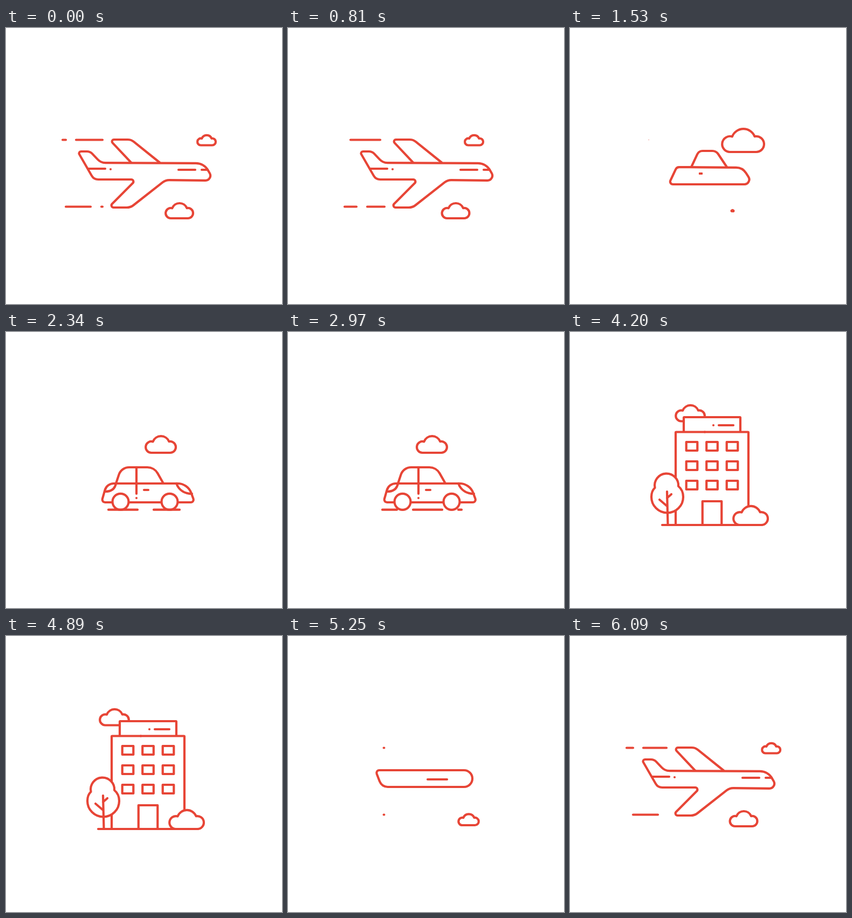
An HTML page with a canvas for the animation above (6.12 s loop, 512 by 512 pixels).

```html
<!DOCTYPE html>
<html lang="en">
<head>
<meta charset="utf-8">
<title>Travel line icons</title>
<style>
html, body { margin: 0; width: 100%; height: 100%; overflow: hidden; background: #fff; }
canvas { display: block; width: 512px; height: 512px; }
</style>
</head>
<body>
<canvas id="stage" width="512" height="512"></canvas>
<script>
const ctx = document.getElementById('stage').getContext('2d');
const LOOP = 6120, STEP = 30, INK = '#e74536', LINE = 4.2;

// Easing
const linear = p => p;
const easeIn = p => p * p;
const smooth = p => p * p * (3 - 2 * p);
const outBack = p => 1 + 1.9 * (p - 1) ** 3 + 0.9 * (p - 1) ** 2;

const mix = (a, b, p) => Array.isArray(a) ? a.map((v, i) => mix(v, b[i], p)) : a + (b - a) * p;

// keys: [time, value, easing towards this key]
function at(t, keys) {
  if (t <= keys[0][0]) return keys[0][1];
  for (let i = 1; i < keys.length; i++) {
    const [t0, a] = keys[i - 1], [t1, b, ease = linear] = keys[i];
    if (t < t1) return mix(a, b, ease((t - t0) / (t1 - t0)));
  }
  return keys[keys.length - 1][1];
}

// plane -> squeeze -> car -> squeeze -> house -> squeeze -> plane
const morph = (plane, a, car, b, house, c, out = outBack) => [
  [1320, plane], [1530, a, easeIn], [1860, car, out],
  [3200, car], [3480, b, easeIn], [3900, house, out],
  [5010, house], [5250, c, easeIn], [5680, plane, out]
];

// 0 -> 1, hold, 1 -> 0
const show = (from, full, leave, gone, ease = outBack) =>
  [[from, 0], [full, 1, ease], [leave, 1], [gone, 0, easeIn]];

// Four corners (x, y, radius) padded to the ten corners of the plane
function quad(tl, tr, br, bl) {
  const top = [0.2, 0.35].map(p => mix(tl, tr, p));
  const base = [0.3, 0.45, 0.6, 0.75].map(p => mix(br, bl, p));
  return [tl, ...top, tr, br, ...base, bl];
}
const block = (x1, y1, x2, y2) => quad([x1, y1, 1], [x2, y1, 1], [x2, y2, 1], [x1, y2, 1]);

const planeHull = [
  [133, 229, 3.5], [156, 229, 14], [176, 250, 20], [367, 251, 26], [386, 283, 9],
  [296, 282, 20], [231, 333, 20], [190, 333, 4], [242, 281, 4], [163, 281, 14]
];
const HULL = morph(
  planeHull,
  quad([198, 258, 7], [320, 259, 22], [340, 290, 9], [183, 290, 5]),
  quad([187, 281, 17], [337, 281, 28], [350, 316, 5], [177, 316, 5]),
  block(212.8, 296.5, 314.5, 358),
  block(196, 185.5, 331, 358),
  quad([162, 249, 5], [342, 249, 15.5], [342, 280, 15.5], [174, 280, 16])
);

// Wing, cabin and roof are one open trapezoid
const trap = (x1, x2, x3, x4, top, base, r1 = 1, r2 = 1) =>
  [[x1, base, 0], [x2, top, r1], [x3, top, r2], [x4, base, 0]];
const TOP = morph(
  trap(232, 192, 232, 285, 207, 249.5, 3.6, 18),
  trap(225, 239, 271, 291, 228, 258, 11, 13),
  trap(204, 214, 275, 292, 251, 281, 20, 22),
  trap(225, 230, 300, 305, 300, 320),
  trap(211, 211, 316, 316, 158, 186),
  trap(220, 220, 260, 270, 255, 260)
);

// Small strokes
const dash = (x1, x2, y) => [x1, y, x2, y];
const dot = (x, y) => dash(x, x, y);
const seed = dash(241, 244, 270), sill = dot(263, 296.5);
const roofEdge = dot(250, 185.5), deckEdge = dot(200, 249);
const MARKS = [
  morph(dash(320, 351, 263), seed, dash(256, 264, 293), sill, dash(276, 303, 173), dash(259, 295, 266)),
  morph(dash(363, 374, 263), seed, dot(260, 293), sill, dot(266, 173), dot(270, 266)),
  morph(dash(153, 184, 261), seed, [242, 251, 242, 300], sill, roofEdge, deckEdge),
  morph(dot(194, 262), seed, dot(242, 308), sill, roofEdge, deckEdge)
];

// Clouds: drift, then [bottom, scale]
const CLOUD_X = [[0, 372], [1530, 321], [2340, 287], [3480, 250.5], [4200, 223], [5230, 190], [5250, 398], [5700, 388], [LOOP, 372]];
const CLOUD = morph([217.5, .607], [230, 1.39], [224, 1], [212, .62], [165.5, .96], [218, 0]);
const CLOUD_FADE = [[5010, 1], [5200, 0], [5249, 0], [5250, 1]];
const BUSH_X = [[0, 321.5], [1530, 301.5], [3480, 294], [3900, 335, smooth], [5250, 335], [LOOP, 321.5]];
const BUSH = morph([353, .91], [340, .07], [340, 0], [358, .06], [358, 1.14], [351, .67], smooth);

const WINDOWS = show(3478, 3900, 5010, 5200);
const DOOR = show(3472, 3900, 5010, 5160);
const TREE = show(3455, 3860, 5010, 5190, linear);
const GROUND = show(3520, 3900, 5010, 5180, smooth);
const WHEEL = show(1600, 1870, 3200, 3400);
const LIGHT = show(1660, 1880, 3200, 3330, smooth);
const ROAD = show(1640, 1900, 3200, 3380, smooth);
const WIND = [ // right end, left end, line width
  [1310, [179, 105, LINE]], [1530, [146.5, 145.8, .7], easeIn], [1545, [146, 146, 0]],
  [5200, [178, 178, 0]], [5250, [178.3, 177.7, LINE]], [5670, [179, 137, LINE], smooth], [5850, [179, 105, LINE]]
];

const cloudPath = new Path2D('M-17.5 0A10.5 10.5 0 1 1-14.5-20.6A16.2 16.2 0 0 1 15.5-20.8A10.5 10.5 0 1 1 17.5 0Z');
const crownPath = new Path2D('M-23.5-69A22 22 0 1 1 20-72C26-67 29-59 29-52A29.5 29.5 0 0 1-30-52C-30-59-28-65-23.5-69Z');
const trunkPath = new Path2D('M.5 0L-1-62M-1-35L-15-47M-1-50L7-57');
const wheelPath = new Path2D('M15 0A15 15 0 1 1-15 0A15 15 0 1 1 15 0Z');
const leftLight = new Path2D('M204 281C202 291 195 296 184 296');
const rightLight = new Path2D('M316 281C321 294 332 300 345 300');

function paint(path, fill = true) {
  if (fill) ctx.fill(path);
  ctx.stroke(path);
}

function place(path, x, y, s, fill) {
  if (s < 0.04) return;
  const p = new Path2D();
  p.addPath(path, new DOMMatrix([s, 0, 0, s, x, y]));
  paint(p, fill);
}

function line(x1, y1, x2, y2) {
  ctx.beginPath();
  ctx.moveTo(x1, y1);
  ctx.lineTo(x2 + 0.01, y2);
  ctx.stroke();
}

function box(cx, cy, w, h) {
  const p = new Path2D();
  p.rect(cx - w / 2, cy - h / 2, w, h);
  paint(p);
}

// Closed polygon whose radii never outgrow its edges
function roundPoly(pts) {
  const p = new Path2D(), n = pts.length, [a, z] = [pts[0], pts[n - 1]];
  p.moveTo((a[0] + z[0]) / 2, (a[1] + z[1]) / 2);
  pts.forEach(([x, y, r], i) => {
    const u = pts[(i + n - 1) % n], v = pts[(i + 1) % n];
    const ux = u[0] - x, uy = u[1] - y, vx = v[0] - x, vy = v[1] - y;
    const lu = Math.hypot(ux, uy), lv = Math.hypot(vx, vy);
    const cos = (ux * vx + uy * vy) / (lu * lv || 1);
    const half = Math.acos(Math.max(-1, Math.min(1, cos))) / 2;
    const most = Math.tan(half) * Math.min(lu, lv) / 2;
    p.arcTo(x, y, v[0], v[1], Math.max(0, Math.min(r, most)));
  });
  p.closePath();
  return p;
}

function roundOpen([a, b, c, d]) {
  const p = new Path2D();
  p.moveTo(a[0], a[1]);
  p.arcTo(b[0], b[1], c[0], c[1], Math.max(0, b[2]));
  p.arcTo(c[0], c[1], d[0], d[1], Math.max(0, c[2]));
  p.lineTo(d[0], d[1]);
  return p;
}

// Dashes running left along a fixed stretch
function stream(y, right, left, on, gap, offset) {
  const len = right - left;
  if (len < 0.3) return;
  if (len > 3) ctx.setLineDash([on, gap]);
  ctx.lineDashOffset = offset;
  line(right, y, left, y);
  ctx.setLineDash([]);
  ctx.lineDashOffset = 0;
}

function wind(t) {
  const [right, left, width] = at(t, WIND);
  if (width <= 0) return;
  const shift = 179 - right - 0.2 * (t > 5000 ? t - LOOP : t);
  ctx.lineWidth = width;
  stream(207.5, right, left, 55, 19, 6 + shift);
  if (t < 1500 || t > 5000) stream(331.5, right, left, 46, 20, 44 + shift);
  ctx.lineWidth = LINE;
}

function carParts(t, hull) {
  const wheel = at(t, WHEEL), light = at(t, LIGHT), road = at(t, ROAD);
  if (light > 0) {
    ctx.save();
    ctx.translate(0, hull[3][1] - 281);
    ctx.setLineDash([42 * light, 99]);
    ctx.stroke(leftLight);
    ctx.stroke(rightLight);
    ctx.restore();
  }
  const y = hull[9][1] - 1.2;
  place(wheelPath, 212.5, y, wheel);
  place(wheelPath, 303.5, y, wheel);
  const right = mix(250, 322, road), left = mix(250, 175, road);
  stream(329.7, right, left, 54, 30, 328 - right - 0.2 * (t - 2340));
}

function houseParts(t, hull) {
  const s = at(t, WINDOWS), top = hull[0][1], floor = hull[9][1];
  if (s > 0) {
    for (let i = 0; i < 9; i++) {
      const y = top + 10.5 + 16 * s + 36 * s * Math.floor(i / 3);
      box(226 + 37.5 * (i % 3), y, 20.6 * s, 16 * s);
    }
  }
  const door = at(t, DOOR);
  if (door > 0) box(263.5, floor - 22 * door, 35.5 * door, 44 * door);
  const ground = at(t, GROUND);
  if (ground > 0) line(mix(263, 171, ground), 358, mix(263, 356, ground), 358);
  const tree = at(t, TREE), x = mix(219, 181, tree);
  place(crownPath, x, 358, tree);
  place(trunkPath, x, 358, tree, false);
}

function draw(t) {
  ctx.fillStyle = '#fff';
  ctx.fillRect(0, 0, 512, 512);
  ctx.strokeStyle = INK;
  ctx.lineWidth = LINE;
  ctx.lineCap = ctx.lineJoin = 'round';

  const hull = at(t, HULL);
  const [cloudY, cloudScale] = at(t, CLOUD);
  place(cloudPath, at(t, CLOUD_X), cloudY, cloudScale * at(t, CLOUD_FADE));
  wind(t);
  paint(roundOpen(at(t, TOP)));
  paint(roundPoly(hull));
  carParts(t, hull);
  MARKS.forEach(keys => line(...at(t, keys)));
  houseParts(t, hull);
  place(cloudPath, at(t, BUSH_X), ...at(t, BUSH));
}

const start = performance.now();
function tick() {
  const t = (performance.now() - start + 2) % LOOP;
  draw(Math.floor(t / STEP) * STEP);
  requestAnimationFrame(tick);
}
tick();
</script>
</body>
</html>
```
